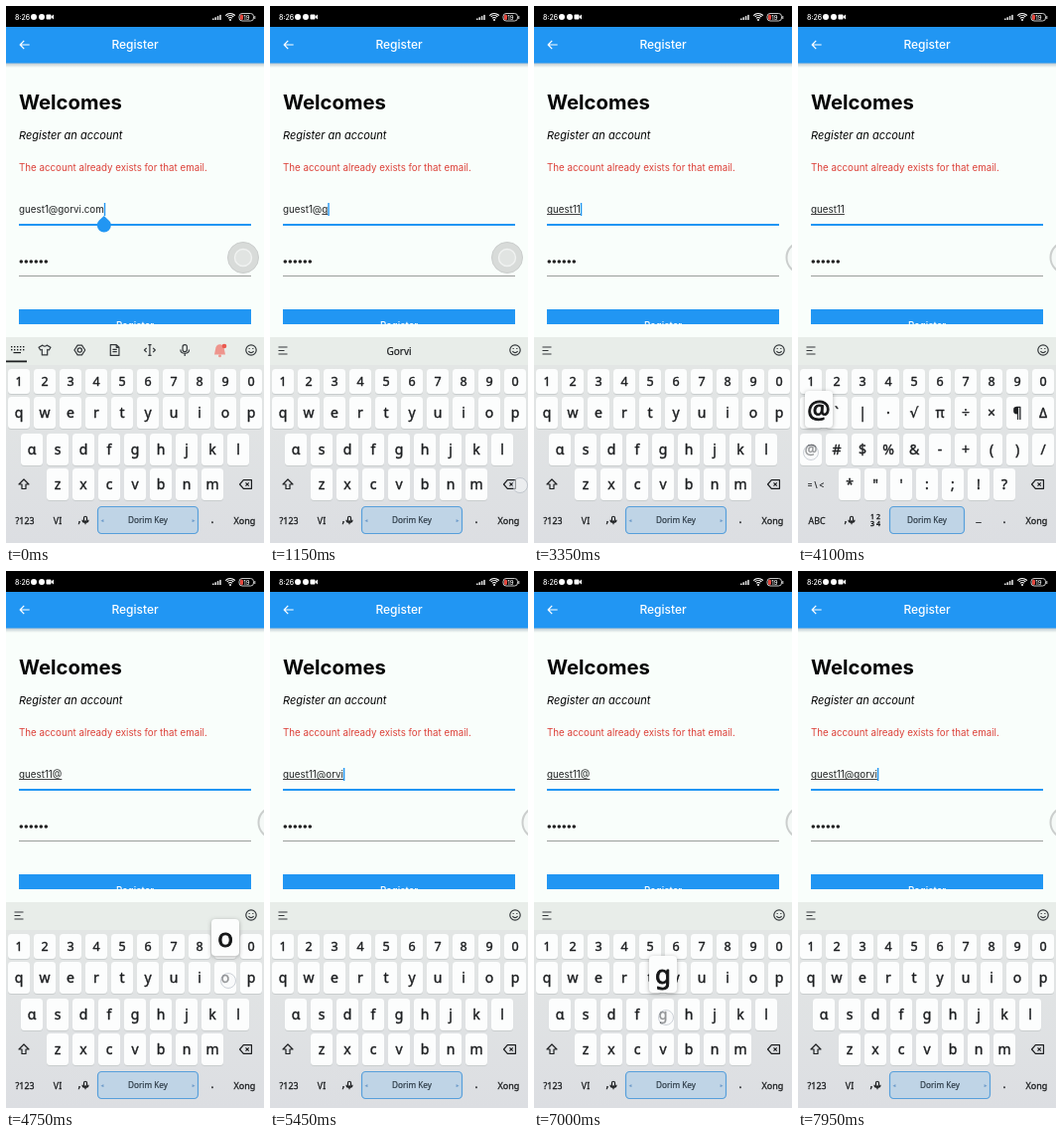
Write an HTML page with a canvas that moves like this. It is 260 by 540 pixels and loops after 8000 ms.

```html
<!DOCTYPE html>
<html lang="en">
<head>
<meta charset="utf-8">
<title>Register</title>
<style>
  html, body { margin: 0; width: 100%; height: 100%; overflow: hidden; background: #f9fefb; }
  canvas { display: block; width: 260px; height: 540px; }
</style>
</head>
<body>
<canvas id="stage"></canvas>
<script>
const W = 260, H = 540, LOOP = 8000, TAP = 100;
const canvas = document.getElementById('stage');
const ctx = canvas.getContext('2d');
const dpr = window.devicePixelRatio || 1;
canvas.width = W * dpr;
canvas.height = H * dpr;

const UI = 'Inter, "Open Sans", sans-serif';
const KEY = '"Noto Sans", "DejaVu Sans", sans-serif';
const BLUE = '#2196f3', PAPER = '#f9fefb', INK = '#1c1e20';
const START_TEXT = 'guest1@gorvi.com';
const BACK = 'back', MODE = 'mode';

// Press times; a key takes effect on release.
const every = (start, step, count, key) =>
  Array.from({ length: count }, (_, i) => ({ at: start + i * step, key }));
const typed = (start, step, word) =>
  [...word].map((key, i) => ({ at: start + i * step, key }));
const taps = [
  ...every(10, 140, 11, BACK),
  ...typed(2800, 250, '11'),
  { at: 3450, key: MODE },
  { at: 4050, key: '@' },
  { at: 4400, key: MODE },
  ...typed(4700, 180, 'orvi'),
  ...every(5800, 190, 4, BACK),
  { at: 6950, key: 'g' },
  ...typed(7180, 170, 'orvi'),
];

const ICONS = {
  arrow: 'M21 12H4M11 4.5L3.5 12L11 19.5',
  menu: 'M3 5H21M3 12H15M3 19H21',
  smile: 'M12 2A10 10 0 1 0 12 22A10 10 0 1 0 12 2M7 14Q12 20 17 14M8.5 8V10M15.5 8V10',
  shirt: 'M8 3L1 7L4 12L7 11V21H17V11L20 12L23 7L16 3Q12 7 8 3Z',
  gear: 'M8 3H16L22 12L16 21H8L2 12ZM12 8A4 4 0 1 0 12 16A4 4 0 1 0 12 8',
  note: 'M4 2H15L20 7V22H4ZM15 2V7H20M8 11H16M8 15H16',
  caret: 'M12 3V21M9 2H15M9 22H15M6 8L2 12L6 16M18 8L22 12L18 16',
  mic: 'M12 2Q8 2 8 6V11Q8 15 12 15Q16 15 16 11V6Q16 2 12 2M4 11Q4 18 12 18Q20 18 20 11M12 18V23',
  shift: 'M12 2L2 12H8V21H16V12H22Z',
  back: 'M8 4H23V20H8L1 12ZM12 9L18 15M18 9L12 15',
};

function text(str, x, y, font, color = INK, align = 'left') {
  ctx.font = font;
  ctx.fillStyle = color;
  ctx.textAlign = align;
  ctx.fillText(str, x, y);
}

// Keyboard lettering: a rounded stroke thickens the face.
function keyText(str, x, y, size, color = INK, weight = .4) {
  ctx.lineWidth = weight;
  ctx.lineJoin = 'round';
  ctx.strokeStyle = color;
  text(str, x, y, `500 ${size}px ${KEY}`, color, 'center');
  ctx.strokeText(str, x, y);
}

function rect(x, y, w, h, color) {
  ctx.fillStyle = color;
  ctx.fillRect(x, y, w, h);
}

function round(x, y, w, h, r, fill, stroke, width = 1) {
  ctx.beginPath();
  ctx.roundRect(x, y, w, h, r);
  if (fill) { ctx.fillStyle = fill; ctx.fill(); }
  if (stroke) { ctx.strokeStyle = stroke; ctx.lineWidth = width; ctx.stroke(); }
}

const disc = (x, y, r, fill, stroke, width) =>
  round(x - r, y - r, 2 * r, 2 * r, r, fill, stroke, width);

function icon(name, x, y, size = 13, color = '#33373a') {
  const scale = size / 24;
  ctx.save();
  ctx.translate(x - size / 2, y - size / 2);
  ctx.scale(scale, scale);
  ctx.strokeStyle = color;
  ctx.lineWidth = 1.2 / scale;
  ctx.lineJoin = 'round';
  ctx.stroke(new Path2D(ICONS[name]));
  ctx.restore();
}

function buildKeys(rows) {
  const tops = [365, 393, 430, 465], heights = [25, 32, 32, 32];
  return rows.flatMap((row, r) => {
    const first = r === 3 ? 52 : 13 + (10 - row.length) * 13;
    return row.map((label, i) => ({
      label, x: first + i * 26, y: tops[r] + heights[r] / 2, h: heights[r],
    }));
  });
}
const letters = buildKeys(['1234567890', 'qwertyuiop', 'asdfghjkl', 'zxcvbnm'].map(s => [...s]));
const symbols = buildKeys(['1234567890', '~`|·√π÷×¶Δ', '@#$%&-+()/', '*"\':;!?'].map(s => [...s]));

function stateAt(t) {
  let value = START_TEXT, symbolic = false, lastEdit = 0;
  for (const { at, key } of taps) {
    if (at + TAP > t) break;
    if (key === MODE) { symbolic = !symbolic; continue; }
    value = key === BACK ? value.slice(0, -1) : value + key;
    lastEdit = at + TAP;
  }
  const tap = taps.find(p => t >= p.at && t < p.at + TAP);
  return { value, symbolic, lastEdit, tap, caret: (t - lastEdit) % 1000 < 500 };
}

function drawStatusBar() {
  rect(0, 0, W, 21, '#000');
  text('8:26', 9, 14, '500 7px ' + UI, '#fff');
  disc(28, 11, 3, '#fff');
  disc(36, 11, 3, '#fff');
  round(40.5, 8.5, 5, 5, 1, '#fff');
  ctx.beginPath();
  ctx.moveTo(45, 11); ctx.lineTo(48, 8.5); ctx.lineTo(48, 13.5);
  ctx.fill();
  for (let i = 0; i < 4; i++) {
    rect(208 + i * 2.4, 12.5 - i * 1.2, 1.6, 1.5 + i * 1.2, '#ddd');
  }
  ctx.strokeStyle = '#fff';
  ctx.lineWidth = 1.2;
  for (const r of [2.5, 4.5, 6.5]) {
    ctx.beginPath();
    ctx.arc(226, 14, r, -Math.PI * .76, -Math.PI * .24);
    ctx.stroke();
  }
  disc(226, 14, 1, '#fff');
  round(235, 7.5, 14.5, 7.5, 3, null, '#ddd', .9);
  round(236, 8.5, 3, 5.5, 1.5, '#e5483e');
  rect(250.3, 10, 1, 3, '#ddd');
  text('19', 242.5, 13.5, '500 6px ' + UI, '#fff', 'center');
}

function drawField({ value, lastEdit, caret }) {
  const x = 13, font = '9.8px ' + UI;
  text(value, x, 208, font, '#1f2122');
  const end = x + ctx.measureText(value).width;
  if (lastEdit) {
    const prefix = value.startsWith('guest1@') ? value.match(/^.*[@.]/)[0] : '';
    const from = x + ctx.measureText(prefix).width;
    rect(from, 209, end - from, 1, '#444');
  }
  rect(x, 219, 234, 2, BLUE);
  if (caret) rect(end, 198, 1.4, 13, BLUE);
  if (!lastEdit) {
    ctx.fillStyle = BLUE;
    ctx.beginPath();
    ctx.moveTo(end, 211);
    ctx.lineTo(end + 5.2, 216);
    ctx.arc(end, 220.5, 7, -Math.PI / 4, Math.PI * 1.25);
    ctx.closePath();
    ctx.fill();
  }
}

function drawPage(state) {
  rect(0, 0, W, H, PAPER);
  const shade = ctx.createLinearGradient(0, 57, 0, 62);
  shade.addColorStop(0, '#b9c4c9');
  shade.addColorStop(1, PAPER);
  rect(0, 57, W, 5, shade);
  rect(0, 21, W, 36.5, BLUE);
  drawStatusBar();
  icon('arrow', 18.8, 39, 13, '#fff');
  text('Register', 130, 43, '500 12px ' + UI, '#fff', 'center');
  text('Welcomes', 13, 104, '700 20.3px ' + UI, '#050505');
  text('Register an account', 13, 133.5, 'italic 11px ' + UI, '#000');
  text('The account already exists for that email.', 13, 165.5, '9.75px ' + UI, '#dc4038');
  drawField(state);
  for (let i = 0; i < 6; i++) disc(15.3 + i * 5, 257, 1.8, '#222');
  rect(13, 271, 234, 1, '#9b9e9c');

  ctx.save();
  ctx.beginPath();
  ctx.rect(0, 300, W, 20);
  ctx.clip();
  rect(13, 305, 234, 30, BLUE);
  text('Register', 130, 325, '500 9.7px ' + UI, '#fff', 'center');
  ctx.restore();
}

function drawBall(t) {
  const p = Math.min(1, Math.max(0, (t - 1900) / 250));
  const x = 239 + 31 * p * p * (3 - 2 * p);
  disc(x, 253, 15.5, p < 1 ? '#d8dbd9' : '#f5f9f7', '#cbcecd', 1 + p);
  disc(x, 253, 8.5, '#e1e4e2', '#f0f2f1', 1.4);
}

function drawToolbar() {
  for (let row = 0; row < 2; row++) {
    for (let i = 0; i < 5; i++) rect(5 + i * 3, 342 + row * 3, 1.4, 1.4, INK);
  }
  rect(7.5, 348, 7.5, 1.2, INK);
  rect(0, 356.5, 21, 1.8, INK);
  ['shirt', 'gear', 'note', 'caret', 'mic'].forEach((name, i) => icon(name, 39 + i * 35.3, 346));
  ctx.fillStyle = '#ee958d';
  ctx.beginPath();
  ctx.arc(215.5, 344.5, 4.3, Math.PI, 0);
  ctx.lineTo(221, 350.5);
  ctx.lineTo(210, 350.5);
  ctx.fill();
  disc(215.5, 351.8, 1.5, '#ee958d');
  disc(220, 342, 2.3, '#ea5a50');
}

function drawSuggestions({ value, lastEdit }) {
  rect(0, 333, W, 28, '#e8ede9');
  icon('smile', 247, 346, 12.5);
  if (!lastEdit) return drawToolbar();
  icon('menu', 13, 346.5, 12);
  if (/^guest1?$/.test(value)) {
    keyText('guest1@gorvi.com', 59.5, 350, 7.3, INK, .2);
    keyText('guest@gorvi.com', 129.5, 350, 8.9, INK, .3);
    keyText('guest2@gorvi.com', 200, 350, 7.3, INK, .2);
    for (const dx of [-4, 0, 4]) disc(130 + dx, 356.5, .8, INK);
  } else if (/^guest1@g\w*$/.test(value)) {
    keyText('Gorvi', 130, 350.5, 10, INK, .2);
  }
}

// The keyboard face has round, single-storey letters.
const glyph = c => ({ a: 'ɑ', g: 'ɡ' })[c] || c;

function drawKey({ label, x, y, h }) {
  round(x - 11, y - h / 2 + 1, 22, h, 3.5, '#c9cdce');
  round(x - 11, y - h / 2, 22, h, 3.5, '#fcfdfd');
  const digit = h < 30;
  keyText(glyph(label), x, y + (digit ? 4.5 : 5), digit ? 12.5 : 14);
}

function drawBottomRow(symbolic) {
  const micX = symbolic ? 54 : 80;
  const spaceW = symbolic ? 76 : 102, middle = 92 + spaceW / 2;
  keyText(symbolic ? 'ABC' : '?123', 19, 520.5, 8.8, INK, .3);
  keyText(',', micX - 6, 520, 11);
  icon('mic', micX, 517, 9, INK);
  if (symbolic) {
    keyText('1 2', 78, 516, 7);
    keyText('3 4', 78, 523, 7);
    keyText('_', 182, 518, 11);
  } else {
    keyText('VI', 52, 520.5, 8.8, INK, .3);
  }
  round(92.5, 503.5, spaceW - 1, 27, 4, '#bfd4e6', '#579fdb', 1.2);
  if (!symbolic) {
    keyText('◂', 97, 519, 5, '#6f9cca', .2);
    keyText('▸', 189, 519, 5, '#6f9cca', .2);
  }
  keyText('Dorim Key', middle, 520, 8.2, '#2c3a46', .2);
  keyText('.', 208, 520, 11);
  keyText('Xong', 240.5, 520.5, 9, INK, .3);
}

function drawTouch(key, keys) {
  const fixed = { [BACK]: { x: 249, y: 479 }, [MODE]: { x: 19, y: 515 } };
  const spot = fixed[key] || keys.find(k => k.label === key);
  const nudge = spot.x < 20 ? 0 : 3;
  disc(spot.x + nudge, spot.y + 3, 7.5, 'rgba(246,248,250,.55)', 'rgba(150,158,170,.45)');
  if (fixed[key]) return;
  const x = Math.min(239, Math.max(21, spot.x)), y = spot.y - 41;
  ctx.save();
  ctx.shadowColor = 'rgba(0,0,0,.3)';
  ctx.shadowBlur = 4 * dpr;
  ctx.shadowOffsetY = dpr;
  round(x - 14, y - 18, 28, 37, 4, '#fcfdfd');
  ctx.restore();
  keyText(glyph(key), x, y + 10, 26, '#151617', .9);
}

function drawKeyboard(state) {
  const { symbolic, tap } = state;
  const keys = symbolic ? symbols : letters;
  const back = ctx.createLinearGradient(0, 361, 0, H);
  back.addColorStop(0, '#e3e6e5');
  back.addColorStop(1, '#dcdee2');
  rect(0, 333, W, H - 333, back);
  drawSuggestions(state);
  keys.forEach(drawKey);
  if (symbolic) keyText('= \\ <', 18, 484.5, 8, INK, .2);
  else icon('shift', 18, 481, 12, INK);
  icon('back', 241.5, 481, 13, INK);
  drawBottomRow(symbolic);
  if (tap) drawTouch(tap.key, keys);
}

function frame(now) {
  const t = now % LOOP;
  const state = stateAt(t);
  ctx.setTransform(dpr, 0, 0, dpr, 0, 0);
  drawPage(state);
  drawBall(t);
  drawKeyboard(state);
}

const started = performance.now();
function tick() {
  frame(performance.now() - started);
  requestAnimationFrame(tick);
}
tick();
</script>
</body>
</html>
```
